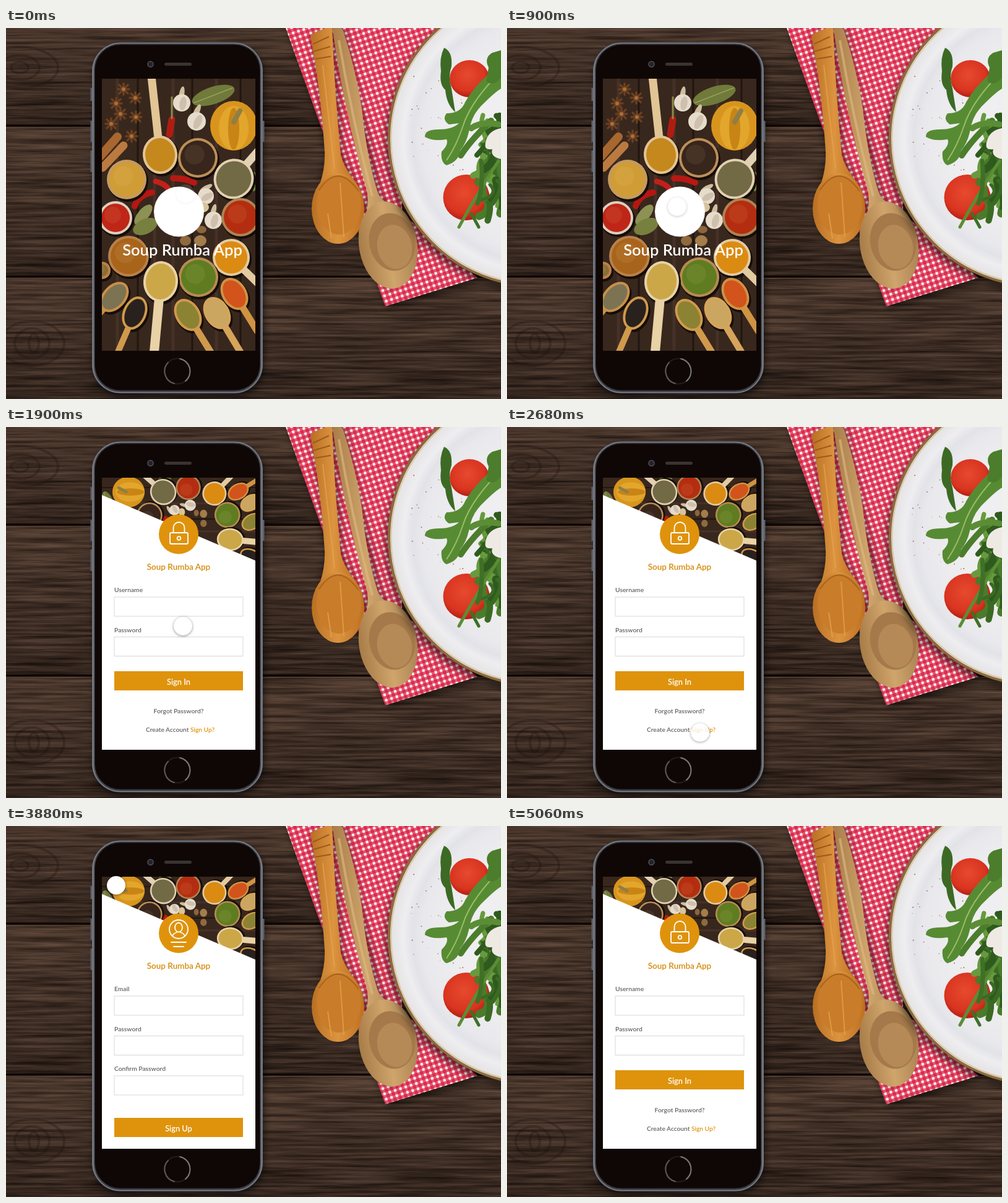
These frames come from a looping animation (800x600 px, 5.08 s). An HTML page:

```html
<!DOCTYPE html>
<html lang="en">
<head>
<meta charset="utf-8">
<title>Soup Rumba App</title>
<style>
html, body { margin: 0; width: 100%; height: 100%; overflow: hidden; background: #3b2a22; }
body { --ease: cubic-bezier(.22, 1, .36, 1); --loop: 5080ms; }
#stage { position: absolute; left: 0; top: 0; width: 800px; height: 600px; overflow: hidden; }
svg { display: block; position: absolute; left: 0; top: 0; }
text { font-family: Lato, "Open Sans", sans-serif; font-weight: 600; }

#screen { position: absolute; left: 155px; top: 82px; width: 248px; height: 440px; overflow: hidden; isolation: isolate; background: #fff; }
.page { position: absolute; inset: 0; overflow: hidden; will-change: transform; animation: var(--move) var(--loop) var(--ease) infinite; }
.page::after { content: ""; position: absolute; inset: 0; background: #000; opacity: 0; animation: var(--dim) var(--loop) var(--ease) infinite; }
#splash { --move: splash; --dim: splash-dim; z-index: 0; }
#login { --move: login; --dim: login-dim; z-index: 1; }
#signup { --move: signup; --dim: signup-dim; z-index: 2; }

@keyframes splash {
  0%, 24.88% { transform: translateX(0); }
  34.72%, 100% { transform: translateX(-74.4px); }
}
@keyframes login {
  0%, 24.88% { transform: translateX(248px); z-index: 1; }
  34.72%, 53.64% { transform: translateX(0); z-index: 1; }
  63.48% { transform: translateX(-74.4px); z-index: 1; }
  63.5%, 86.46% { transform: translateX(-248px); z-index: 3; }
  96.3%, 100% { transform: translateX(0); z-index: 3; }
}
@keyframes signup {
  0%, 53.64% { transform: translateX(248px); }
  63.48%, 86.46% { transform: translateX(0); }
  96.3%, 100% { transform: translateX(74.4px); }
}
@keyframes splash-dim { 0%, 24.88% { opacity: 0; } 34.72%, 100% { opacity: .25; } }
@keyframes login-dim { 0%, 53.64% { opacity: 0; } 63.48% { opacity: .25; } 63.5%, 100% { opacity: 0; } }
@keyframes signup-dim { 0%, 86.46% { opacity: 0; } 96.3%, 100% { opacity: .25; } }

#touch {
  position: absolute; z-index: 1; width: 30px; height: 30px; margin: -15px 0 0 -15px; border-radius: 50%;
  background: #fff; box-shadow: 0 1px 4px rgba(0, 0, 0, .45);
  animation: touch-x var(--loop) ease-in-out infinite, touch-y var(--loop) ease-in-out infinite, touch-fade var(--loop) linear infinite;
}
@keyframes touch-x {
  0% { left: 290px; } 9.84% { left: 268px; } 24.88%, 32.3% { left: 281px; } 51% { left: 312px; }
  56% { left: 312px; animation-timing-function: cubic-bezier(.8, 0, .6, 1); }
  74.8%, 100% { left: 178px; }
}
@keyframes touch-y {
  0% { top: 268px; } 9.84% { top: 287px; } 24.88%, 32.3% { top: 290px; }
  51%, 56% { top: 494px; } 74.8%, 100% { top: 96px; }
}
@keyframes touch-fade {
  0% { opacity: .12; } 5% { opacity: .5; } 25% { opacity: .5; } 34% { opacity: 1; }
  50% { opacity: 1; } 52.76% { opacity: .8; } 55% { opacity: 1; }
  86.4% { opacity: 1; } 87.8% { opacity: .35; } 90%, 100% { opacity: 0; }
}
</style>
</head>
<body>
<div id="stage">
<svg width="800" height="600">
  <defs>
    <filter id="grain" x="0" y="0" width="100%" height="100%" color-interpolation-filters="sRGB">
      <feTurbulence type="fractalNoise" baseFrequency=".008 .22" numOctaves="4" seed="8"/>
      <feColorMatrix values=".38 0 0 0 .05  .3 0 0 0 .025  .25 0 0 0 .015  0 0 0 0 1"/>
    </filter>
    <linearGradient id="board" x2="0" y2="1">
      <stop offset="0" stop-color="#8a6a55" stop-opacity=".14"/><stop offset="1" stop-color="#000" stop-opacity=".16"/>
    </linearGradient>
    <pattern id="gingham" width="9" height="9" patternUnits="userSpaceOnUse" patternTransform="rotate(-18)">
      <path d="M0 0H9V9H0Z" fill="#fff6f6"/>
      <path d="M0 0H5V9H0Z" fill="#d8163a" opacity=".7"/>
      <path d="M0 0H9V5H0Z" fill="#d8163a" opacity=".7"/>
    </pattern>
    <radialGradient id="china" gradientUnits="userSpaceOnUse" cx="857" cy="179" r="238">
      <stop offset=".5" stop-color="#efeef0"/><stop offset=".78" stop-color="#e9e8ec"/>
      <stop offset=".84" stop-color="#e2e3e8"/><stop offset=".9" stop-color="#eeedf0"/><stop offset="1" stop-color="#e4e2e2"/>
    </radialGradient>
    <radialGradient id="tomato" cx=".45" cy=".4" r=".62">
      <stop offset="0" stop-color="#e64a2e"/><stop offset=".7" stop-color="#d93420"/><stop offset="1" stop-color="#ad1c10"/>
    </radialGradient>
    <linearGradient id="honey">
      <stop offset="0" stop-color="#b96f22"/><stop offset=".5" stop-color="#dc9440"/><stop offset="1" stop-color="#bd7020"/>
    </linearGradient>
    <linearGradient id="beech">
      <stop offset="0" stop-color="#a87c48"/><stop offset=".5" stop-color="#cfa56c"/><stop offset="1" stop-color="#a98252"/>
    </linearGradient>
    <linearGradient id="frame">
      <stop offset="0" stop-color="#686c76"/><stop offset=".03" stop-color="#40434b"/>
      <stop offset=".97" stop-color="#40434b"/><stop offset="1" stop-color="#686c76"/>
    </linearGradient>
    <filter id="soft" x="-20%" y="-20%" width="140%" height="140%"><feGaussianBlur stdDeviation="6"/></filter>
    <g id="photo"></g>
  </defs>

  <!-- table -->
  <rect width="800" height="600" filter="url(#grain)"/>
  <path d="M0 0H800V158H0Z" fill="url(#board)"/>
  <path d="M0 158H800V402H0Z" fill="url(#board)"/>
  <path d="M0 402H800V600H0Z" fill="url(#board)"/>
  <path d="M0 158H800M0 402H800" fill="none" stroke="#0d0705" stroke-width="3.5"/>
  <path d="M0 161H800M0 405H800" fill="none" stroke="#745947" opacity=".6"/>
  <g fill="none" stroke="#1d120d" stroke-width="4" opacity=".3">
    <ellipse cx="22" cy="64" rx="14" ry="9"/><ellipse cx="22" cy="64" rx="32" ry="20"/><ellipse cx="24" cy="64" rx="60" ry="33"/>
    <ellipse cx="45" cy="510" rx="8" ry="15"/><ellipse cx="42" cy="510" rx="28" ry="24"/><ellipse cx="42" cy="510" rx="52" ry="36"/>
  </g>

  <!-- cloth -->
  <path d="M455 4 617 456 766 410 640 290V90L700 0Z" opacity=".5" filter="url(#soft)"/>
  <path d="M452 0H700L640 100V300L762 404 613 450Z" fill="url(#gingham)"/>

  <!-- wooden spoons -->
  <g opacity=".45" filter="url(#soft)">
    <path d="M494 12 531 0 545 205 584 290 540 352 500 310 517 200Z"/>
    <path d="M530 0H548L606 268 670 350 620 424 574 360 586 262Z"/>
  </g>
  <g fill="url(#honey)">
    <path d="M492 13Q500 4 527 -2Q531 100 541 205Q546 227 566 250L508 250Q516 225 515 200Q509 100 492 13Z"/>
    <ellipse cx="536.5" cy="292" rx="42.5" ry="57"/>
  </g>
  <ellipse cx="538" cy="286" rx="36" ry="48" fill="#c97c2a"/>
  <path d="M506 262Q536 216 570 264" fill="none" stroke="#a8641d" stroke-width="2"/>
  <path d="M496 26 522 14M497 38 524 30M500 50 525 46" fill="none" stroke="#9a5a1c" stroke-width="2"/>
  <path d="M512 60 531 228M520 300 526 340M540 250 546 338" fill="none" stroke="#e5a650" stroke-width="2" opacity=".7"/>
  <g fill="url(#beech)">
    <path d="M527 -4Q535 -8 545 4Q566 70 575 130Q583 210 601 266Q606 280 640 302L578 316Q588 285 583 262Q545 130 527 -4Z"/>
    <ellipse cx="617.5" cy="351" rx="47" ry="71" transform="rotate(-9 617 351)"/>
  </g>
  <ellipse cx="624" cy="346" rx="37" ry="47" fill="#a5794a" transform="rotate(-12 624 346)"/>
  <ellipse cx="628" cy="354" rx="28" ry="36" fill="#b58a57" transform="rotate(-12 628 354)"/>
  <path d="M538 20Q560 150 592 272" fill="none" stroke="#e0bb84" stroke-width="4" opacity=".6"/>

  <!-- plate -->
  <circle cx="853" cy="187" r="240" opacity=".5" filter="url(#soft)"/>
  <circle cx="857" cy="179" r="238" fill="url(#china)" stroke="#8c6a3c" stroke-width="4"/>
  <circle cx="857" cy="179" r="234.5" fill="none" stroke="#d9c39c" stroke-width="1.5"/>
  <g id="specks" fill="#a0684a"></g>
  <path d="M714 268Q706 296 735 312L780 300Z" fill="#b9b7bc" opacity=".6"/>
  <ellipse cx="749" cy="82" rx="32" ry="30" fill="url(#tomato)"/>
  <ellipse cx="744" cy="274" rx="37.5" ry="37" fill="url(#tomato)"/>
  <g id="greens" fill="none" stroke-linecap="round"></g>
  <path d="M708 32Q722 38 720 62Q714 78 720 98L726 136Q712 124 710 100Q700 92 703 70Q700 48 708 32Z" fill="#3c6a24"/>
  <path d="M800 58Q760 88 742 120Q735 138 712 138Q704 148 716 156L732 154Q722 164 700 164Q676 164 677 176Q690 184 712 180Q716 188 704 200Q702 218 712 222Q732 216 734 198Q744 186 748 168Q752 140 772 122Q790 104 800 98Z" fill="#568b33"/>
  <path d="M798 72Q750 120 738 160Q728 190 712 214" fill="none" stroke="#9bbd66" stroke-width="2"/>
  <path d="M786 40Q772 48 780 64L776 86Q788 96 800 80V36Z" fill="#4b7d2c"/>
  <path d="M775 186Q778 166 800 162V212Q782 208 786 196Q772 198 775 186Z" fill="#efe9e4"/>

  <!-- phone -->
  <rect x="143" y="30" width="274" height="566" rx="46" opacity=".6" filter="url(#soft)"/>
  <path d="M138 97V118M138 150V184M138 198V233M416 150V184" fill="none" stroke="#5c606a" stroke-width="3"/>
  <rect x="139" y="23" width="276" height="568" rx="46" fill="url(#frame)"/>
  <rect x="140.5" y="24.5" width="273" height="565" rx="44.5" fill="none" stroke="#7b808a" stroke-width="1.5"/>
  <rect x="143.5" y="27" width="267" height="559" rx="41" fill="#0f0705" stroke="#25211f"/>
  <circle cx="233.5" cy="58.5" r="4.5" fill="#23232a" stroke="#50505a" stroke-width="1.5"/>
  <rect x="256" y="56" width="44" height="5" rx="2.5" fill="#383432"/>
  <g fill="none" stroke-width="2" stroke-linecap="round">
    <circle cx="277" cy="555" r="20.5" stroke="#211c1b"/>
    <path d="M281 535A20.5 20.5 0 0 1 290 571" stroke="#77777a"/>
    <path d="M262 541A20.5 20.5 0 0 0 272 575" stroke="#59595c"/>
  </g>
</svg>

<div id="screen">
  <div class="page" id="splash">
    <svg width="248" height="440" viewBox="155 82 248 440">
      <use href="#photo"/>
      <circle cx="279.5" cy="297" r="40.5" fill="#fff"/>
      <text x="285" y="368" font-size="25.5" text-anchor="middle" fill="#fff">Soup Rumba App</text>
    </svg>
  </div>
  <div class="page" id="login"></div>
  <div class="page" id="signup"></div>
</div>
<div id="touch"></div>
</div>

<script>
const $ = id => document.getElementById(id);
let seed = 11;
const rnd = (a, b) => a + (b - a) * ((seed = seed * 16807 % 2147483647) / 2147483647);
const oval = (x, y, rx, ry, fill, turn = 0) =>
  `<ellipse cx="${x}" cy="${y}" rx="${rx}" ry="${ry}" fill="${fill}" transform="rotate(${turn} ${x} ${y})"/>`;
const stroke = (d, color, width) =>
  `<path d="${d}" fill="none" stroke="${color}" stroke-width="${width}" stroke-linecap="round"/>`;

// Bowls and spoons share a rim and a filling; a spoon adds a handle.
const bowl = (x, y, r, rim, fill) =>
  oval(x + 2, y + 3, r + 1, r + 1, '#150d08') + oval(x, y, r, r, rim) + oval(x, y, r - 4, r - 4, fill) +
  oval(x - r / 6, y - r / 6, r * .5, r * .5, 'rgba(255,235,170,.07)');
const spoon = (x, y, rx, ry, rim, fill, hx, hy, w) => {
  const turn = Math.atan2(hy - y, hx - x) * 180 / Math.PI - 90;
  return oval(x + 2, y + 3, rx + 1, ry + 1, '#150d08', turn) + stroke(`M${x} ${y}L${hx} ${hy}`, rim, w) +
    oval(x, y, rx, ry, rim, turn) + oval(x, y, rx - 4, ry - 4, fill, turn);
};
const star = (x, y) =>
  stroke(`M${x - 9} ${y}H${x + 9}M${x} ${y - 9}V${y + 9}M${x - 7} ${y - 7}L${x + 7} ${y + 7}M${x + 7} ${y - 7}L${x - 7} ${y + 7}`, '#6b3f20', 3.5) +
  oval(x, y, 3, 3, '#a8713c');
const bulb = (x, y, r, turn) =>
  oval(x, y - r, r * .3, r * .9, '#cdbf9f', turn) + oval(x, y, r, r, '#e6dccb') + oval(x + 2, y + 1, r * .4, r * .8, '#cfc0ae', turn);

$('photo').innerHTML = [
  '<path d="M60 0H480V600H60Z" fill="#38271d"/>',
  stroke('M213 0V600M301 0V600M379 0V600', '#211610', 3),
  stroke('M180 0V600M240 0V600M270 0V600M340 0V600', '#453127', 5),
  star(190, 99), star(209, 113), star(178, 122), star(185, 139), star(210, 144), star(170, 155), star(203, 175),
  stroke('M152 208 180 176', '#a8672f', 14), stroke('M156 226 190 190', '#bb7a40', 13),
  oval(335, 109, 36, 14, '#707a3a', -18), stroke('M304 121 366 97', '#9aa05c', 1.5),
  oval(222, 302, 20, 9, '#8d9154', -50), oval(225, 321, 21, 12, '#78803f', -25), oval(400, 248, 6, 16, '#748039'),
  stroke('M268 148 264 172', '#b01c12', 11), stroke('M268 112V146', '#8b8a48', 3),
  bulb(284, 121, 14, 10), bulb(308, 151, 15, 25),
  oval(368, 158, 38, 40, '#d8951d'), oval(368, 162, 24, 36, '#e3a62c'), oval(368, 163, 9, 34, '#c98416'),
  stroke('M368 152 378 134', '#8e7f45', 8),
  stroke('M208 288Q214 270 236 266', '#b51712', 10), stroke('M242 248Q258 252 264 262', '#c2201a', 9),
  stroke('M270 243Q288 242 304 250', '#b81813', 10),
  bulb(323, 272, 13, 60), bulb(335, 311, 14, 15), oval(318, 290, 10, 8, '#d8c49a'),
  oval(290, 344, 9, 8, '#8f6a3f'), oval(314, 344, 10, 9, '#a37d4c'), oval(316, 326, 8, 6, '#8a653d'),
  spoon(249, 205, 28, 31, '#e2c595', '#c5881d', 233, 60, 13),
  bowl(310, 210, 32, '#bd8f58', '#38251b'),
  bowl(195, 245, 32, '#c49a62', '#d09c36'),
  spoon(368, 244, 32, 33, '#e2d0b2', '#716a45', 410, 196, 13),
  bowl(177, 307, 27, '#dcd0bf', '#bf2617'),
  bowl(379, 306, 31, '#ad8454', '#b52d10'),
  bowl(198, 369, 33, '#b98149', '#a9641c'),
  spoon(364, 371, 30, 30, '#e3cba0', '#db8b12', 408, 414, 12),
  bowl(311, 403, 32, '#b78b52', '#5f7c20'),
  bowl(155, 392, 14, '#b98149', '#8a6d35'),
  spoon(250, 410, 28, 33, '#e8d2a6', '#cba748', 238, 540, 15),
  spoon(175, 435, 19, 28, '#c99049', '#7c7353', 135, 480, 10),
  spoon(208, 461, 19, 28, '#d09a4c', '#29211d', 180, 526, 10),
  spoon(294, 464, 20, 28, '#d09a4c', '#8b8333', 332, 526, 11),
  spoon(341, 461, 20, 28, '#d6a45a', '#cba661', 380, 526, 11),
  spoon(369, 430, 20, 28, '#cf9344', '#d2531b', 406, 490, 11)
].join('');

let specks = '';
for (let i = 0; i < 30; i++) specks += `<circle cx="${rnd(655, 740)}" cy="${rnd(70, 230)}" r="${rnd(.4, 1.1)}"/>`;
$('specks').innerHTML = specks;

const hues = ['#2f5a1d', '#4a7b2b', '#3b6a24', '#679a3e'];
let greens = '';
for (let i = 0; i < 40; i++) {
  const x = rnd(768, 806), y = rnd(140, 285);
  greens += stroke(`M${x} ${y}q${rnd(-8, 16)} ${rnd(5, 20)} ${rnd(-18, 14)} ${rnd(22, 38)}`, hues[i % 4], rnd(5, 13));
}
greens += stroke('M796 215Q760 270 732 322', '#5b8d35', 5) + stroke('M768 215Q772 258 762 284', '#3f7026', 7) +
  stroke('M735 206Q752 180 784 150', '#4c7d2c', 10) + stroke('M752 162Q770 150 796 156', '#5b8d35', 10) +
  stroke('M752 300 764 322', '#3f7026', 5);
$('greens').innerHTML = greens;

const gold = '#df930c', gray = '#626262';
const label = (s, x, y, size = 10.3, fill = gray, anchor = 'start') =>
  `<text x="${x}" y="${y}" font-size="${size}" fill="${fill}" text-anchor="${anchor}">${s}</text>`;
const field = (name, y) => label(name, 175, y - 8) +
  `<rect x="175" y="${y}" width="208" height="31" fill="#fff" stroke="#d8d8d8"/>`;
const button = (name, y) => `<rect x="175" y="${y}" width="208" height="31" fill="${gold}"/>` +
  label(name, 279, y + 21.5, 12.8, '#fff', 'middle');
const page = (icon, body) => `<svg width="248" height="440" viewBox="155 82 248 440">
  <path d="M155 82h248v440h-248z" fill="#fff"/>
  <use href="#photo" transform="matrix(0 -.652 .652 0 95 345)"/>
  <path d="M155 110 403 216V522H155Z" fill="#fff"/>
  <circle cx="279" cy="173.5" r="32" fill="${gold}"/>
  <g fill="none" stroke="#fff" stroke-width="1.8" stroke-linecap="round" stroke-linejoin="round">${icon}</g>
  ${label('Soup Rumba App', 279, 231, 13.5, '#d48a0a', 'middle')}${body}</svg>`;

$('login').innerHTML = page(
  '<rect x="265" y="171" width="29" height="18" rx="2"/><path d="M270.5 171V163A9 9 0 0 1 288.5 163V171"/><circle cx="279.5" cy="180" r="2.8"/>',
  field('Username', 275) + field('Password', 339.5) + button('Sign In', 395) +
  label('Forgot Password?', 279, 463, 10.3, gray, 'middle') +
  label(`Create Account <tspan fill="${gold}">Sign Up?</tspan>`, 281.5, 492.5, 10.2, gray, 'middle'));

$('signup').innerHTML = page(
  '<circle cx="279" cy="167" r="15"/><ellipse cx="279" cy="164" rx="6" ry="7.5"/><path d="M269 178Q270 174 276 172M289 178Q288 174 282 172M267 188H291M271 195H287"/>' +
  '<path d="M183 98.5H167.5M173.5 92.5 167.5 98.5 173.5 104.5"/>',
  field('Email', 275) + field('Password', 339.5) + field('Confirm Password', 404) + button('Sign Up', 472));
</script>
</body>
</html>
```
